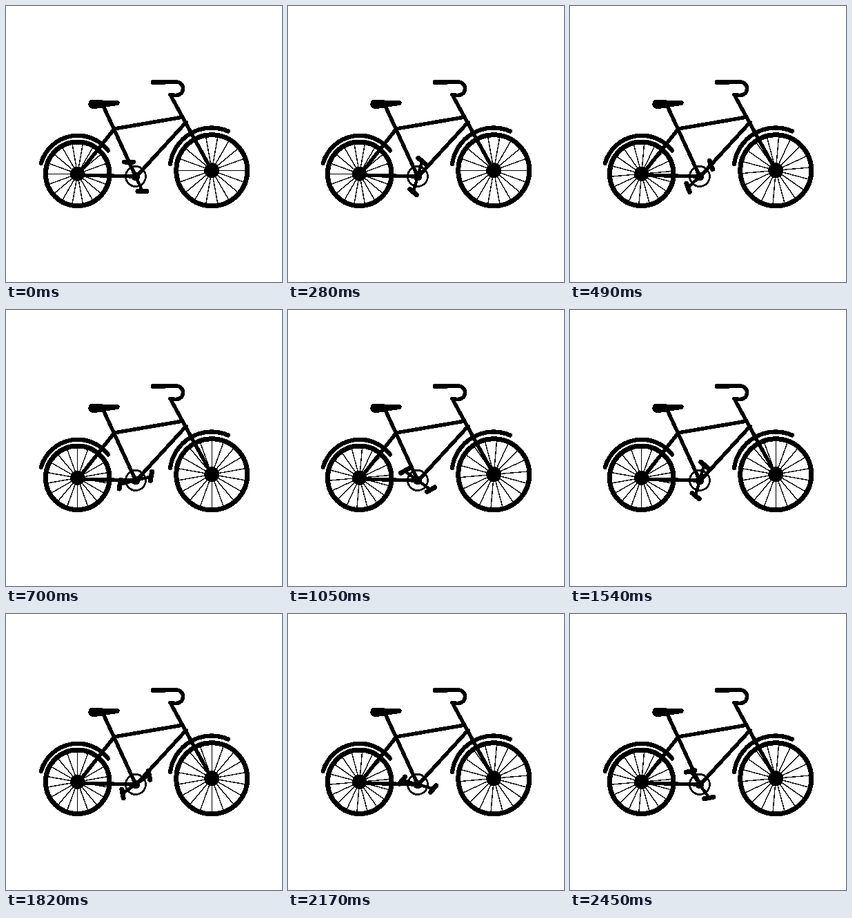
An HTML page that plays this animation: 400x400 px, repeating every 2520 ms.

```html
<!DOCTYPE html>
<html>
<head>
<meta charset="utf-8">
<title>Bicycle</title>
<style>
  html, body { margin: 0; width: 100%; height: 100%; overflow: hidden; background: #fff; }
  svg { display: block; width: 100vw; height: 100vh; }
</style>
</head>
<body>
<svg viewBox="0 0 400 400" fill="none" stroke="#000" stroke-linecap="round" stroke-linejoin="round" shape-rendering="crispEdges">
  <!-- wheels -->
  <circle cx="103.7" cy="243.3" r="46.3" stroke-width="7"/>
  <circle cx="298.3" cy="238.3" r="51.5" stroke-width="7"/>
  <g fill="#000" stroke="none">
    <circle cx="103.7" cy="243.3" r="10.7"/>
    <circle cx="298.3" cy="238.3" r="11"/>
  </g>
  <path id="rear" stroke-width="1.4"/>
  <path id="front" stroke-width="1.4"/>

  <!-- mudguards -->
  <g stroke-width="6.3">
    <path d="M50.800 228A55.300 55.300 0 0 1 148 209.500"/>
    <path d="M238 229A60.500 60.500 0 0 1 322 181.500"/>
  </g>

  <!-- frame, fork and handlebar -->
  <g stroke-width="5.5">
    <path d="M142 147L188 247L104 245L157 178L256 161"/>
    <path d="M188 248L261 168.500"/>
    <path d="M298 238L238 128.500L246 129.500C260 129.500 260 110 246 110L213 110.500"/>
  </g>
  <path d="M213 110.500L231 110" stroke-width="7"/>
  <path d="M126 135.500C117 135.500 117 149 126 149C136 149 150 145 162 144Q168 140 162 136.500Q150 138.500 140 136.500Z" fill="#000" stroke="none"/>

  <!-- chainring and pedals -->
  <circle cx="188" cy="247" r="14.500" stroke-width="2.800"/>
  <circle cx="188" cy="247" r="6.500" fill="#000" stroke="none"/>
  <g id="crank">
    <path d="M178.500 226L197.500 268" stroke-width="4.500"/>
    <path d="M171.500 226H184.500M191 268.500H204" stroke-width="7"/>
  </g>
</svg>
<script>
const STEP = 70, STEPS = 36, SPOKES = 18;
const byId = id => document.getElementById(id);

function drawSpokes(id, radius) {
  byId(id).setAttribute('d', Array.from({ length: SPOKES }, (_, i) => {
    const a = i * 2 * Math.PI / SPOKES;
    return `M0 0L${radius * Math.cos(a)} ${radius * Math.sin(a)}`;
  }).join(''));
}

function spin(id, x, y, angle) {
  byId(id).setAttribute('transform', `translate(${x} ${y}) rotate(${angle})`);
}

function render() {
  const step = Math.floor(performance.now() / STEP) % STEPS;
  spin('rear', 103.7, 243.3, step * 5);
  spin('front', 298.3, 238.3, step * 5);
  byId('crank').setAttribute('transform', `rotate(${step * 10} 188 247)`);
  requestAnimationFrame(render);
}

drawSpokes('rear', 45);
drawSpokes('front', 50);
render();
</script>
</body>
</html>
```
